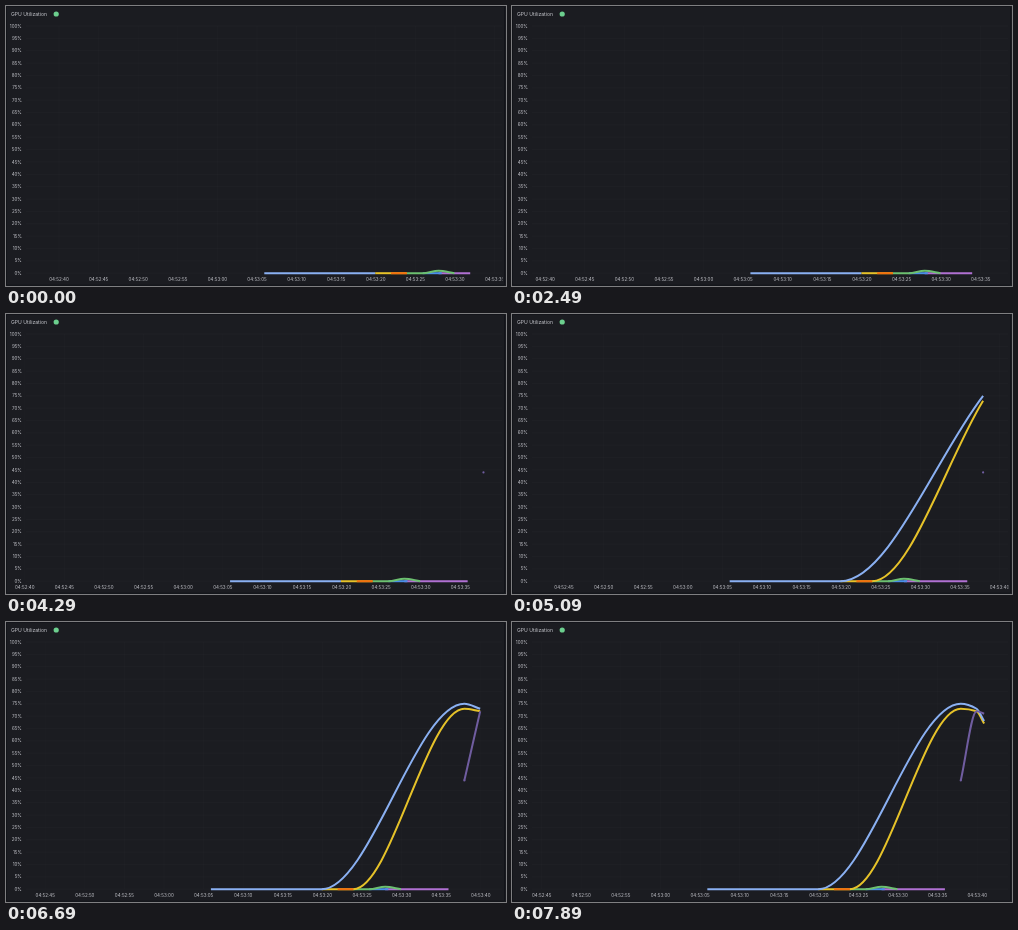
Recreate the animation shown at these times as an HTML page. Size 500 by 280 pixels, loop 8000 ms.

```html
<!DOCTYPE html>
<html lang="en">
<head>
<meta charset="utf-8">
<title>GPU Utilization</title>
<style>
  html, body { margin: 0; width: 100%; height: 100%; overflow: hidden; background: #1b1c21; }
  svg { display: block; width: 100vw; height: 100vh; }
  text { font-family: Inter, Roboto, sans-serif; font-size: 4.5px; fill: #c6c7cd; }
  .title { font-size: 5.1px; }
  .grid { stroke: #fff; stroke-opacity: .028; stroke-width: .6; }
  .series { fill: none; stroke-width: 2; stroke-linejoin: round; }
</style>
</head>
<body>
<svg viewBox="0 0 500 280">
  <defs>
    <clipPath id="panel"><rect width="496.5" height="280"/></clipPath>
    <clipPath id="plot"><rect x="20" y="10" width="476" height="260"/></clipPath>
  </defs>
  <rect width="500" height="280" fill="#1b1c21"/>
  <rect x=".4" y=".4" width="498.2" height="278.8" rx="1" fill="none" stroke="#111217" stroke-width=".8"/>
  <text class="title" x="5" y="9.9">GPU Utilization</text>
  <circle cx="50.2" cy="8" r="2.6" fill="#6ccf8e"/>
  <g id="yAxis"></g>
  <g id="xAxis" clip-path="url(#panel)"></g>
  <g id="lines" clip-path="url(#plot)"></g>
</svg>
<script>
const LOOP = 8000, STEP = 200, PHASE = 110;
const PX_PER_S = 7.92, SCROLL = 7.98, LAG = 0.08;
const BLUE = '#8ab0f2', YELLOW = '#e6c229', ORANGE = '#f2700f', GREEN = '#6cc070',
      AZURE = '#4a90e8', MAGENTA = '#b070d2', VIOLET = '#705da0';
const $ = id => document.getElementById(id);

function add(parent, tag, attrs, label) {
  const el = document.createElementNS('http://www.w3.org/2000/svg', tag);
  for (const k in attrs) el.setAttribute(k, attrs[k]);
  if (label) el.textContent = label;
  return parent.appendChild(el);
}

const yOf = pct => 267.2 - pct * 2.472;
// x of a clock second (counted from 04:53:00) at loop time t
const xOf = (s, t) => 251 + (s - 5) * PX_PER_S - t * SCROLL;

// Each point: [second, percent, loop time at which it arrives]
const series = [
  [MAGENTA, [[28, 0, 0], [32, 0, 0], [34, 0, .89], [36, 0, 2.89]]],
  [AZURE, [[26, 0, 0], [28.4, 0, 0]]],
  [GREEN, [[24, 0, 0], [26, 0, 0], [28, 1, 0], [30, 0, 0]]],
  [YELLOW, [[20, 0, 0], [24, 0, 0], [38, 73, 4.69], [40, 72, 6.09], [40.95, 67, 7.49]]],
  [ORANGE, [[22, 0, 0], [24, 0, 0]]],
  [BLUE, [[6, 0, 0], [20, 0, 0], [38, 75, 4.69], [40, 73, 6.09], [40.95, 68, 7.49]]],
  [VIOLET, [[38, 44, 4.09], [40, 72, 6.09], [40.95, 71, 7.49]]]
].map(([stroke, points]) => ({
  points, path: add($('lines'), 'path', { class: 'series', stroke })
}));
const dot = add($('lines'), 'circle', { r: 1.1, fill: VIOLET });

// Monotone cubic interpolation as a Bezier path
function spline(p) {
  if (p.length < 2) return '';
  const n = p.length - 1, dx = [], d = [];
  for (let i = 0; i < n; i++) {
    dx[i] = p[i + 1][0] - p[i][0];
    d[i] = (p[i + 1][1] - p[i][1]) / dx[i];
  }
  const m = p.map((_, i) => {
    if (i === 0) return d[0];
    if (i === n) return d[n - 1];
    const a = d[i - 1], b = d[i], u = dx[i - 1], v = dx[i];
    return a * b <= 0 ? 0 : 3 * (u + v) / ((2 * v + u) / a + (v + 2 * u) / b);
  });
  let path = `M${p[0]}`;
  for (let i = 0; i < n; i++) {
    const [x0, y0] = p[i], [x1, y1] = p[i + 1], h = dx[i] / 3;
    path += `C${x0 + h},${y0 + m[i] * h} ${x1 - h},${y1 - m[i + 1] * h} ${x1},${y1}`;
  }
  return path;
}

for (let pct = 0; pct <= 100; pct += 5) {
  const y = yOf(pct);
  add($('yAxis'), 'line', { class: 'grid', x1: 20, x2: 496, y1: y, y2: y });
  add($('yAxis'), 'text', { x: 15.8, y: y + 1.6, 'text-anchor': 'end' }, pct + '%');
}

const ticks = [];
for (let s = -25; s <= 45; s += 5) {
  const g = add($('xAxis'), 'g', {});
  const clock = (s < 0 ? '04:52:' : '04:53:') + String((s + 60) % 60).padStart(2, '0');
  add(g, 'line', { class: 'grid', y1: yOf(100), y2: yOf(0) });
  add(g, 'text', { y: 275, 'text-anchor': 'middle' }, clock);
  ticks.push({ s, g });
}

function draw(ms) {
  const k = Math.floor((ms + PHASE) / STEP);
  const t = Math.max(0, k * STEP - PHASE) / 1000;
  for (const { s, g } of ticks) {
    const x = xOf(s, t);
    g.setAttribute('transform', `translate(${x} 0)`);
    g.setAttribute('display', x > 18 && x < 492 ? 'inline' : 'none');
  }
  for (const { points, path } of series) {
    const seen = points.filter(p => p[2] <= t + .001);
    path.setAttribute('d', spline(seen.map(([s, v]) => [xOf(s - LAG, t), yOf(v)])));
  }
  const [s, v, from] = series[series.length - 1].points[0];
  dot.setAttribute('cx', xOf(s - LAG, t));
  dot.setAttribute('cy', yOf(v));
  dot.setAttribute('display', t >= from - .001 ? 'inline' : 'none');
}

function tick() {
  draw(performance.now() % LOOP);
  requestAnimationFrame(tick);
}
tick();
</script>
</body>
</html>
```
